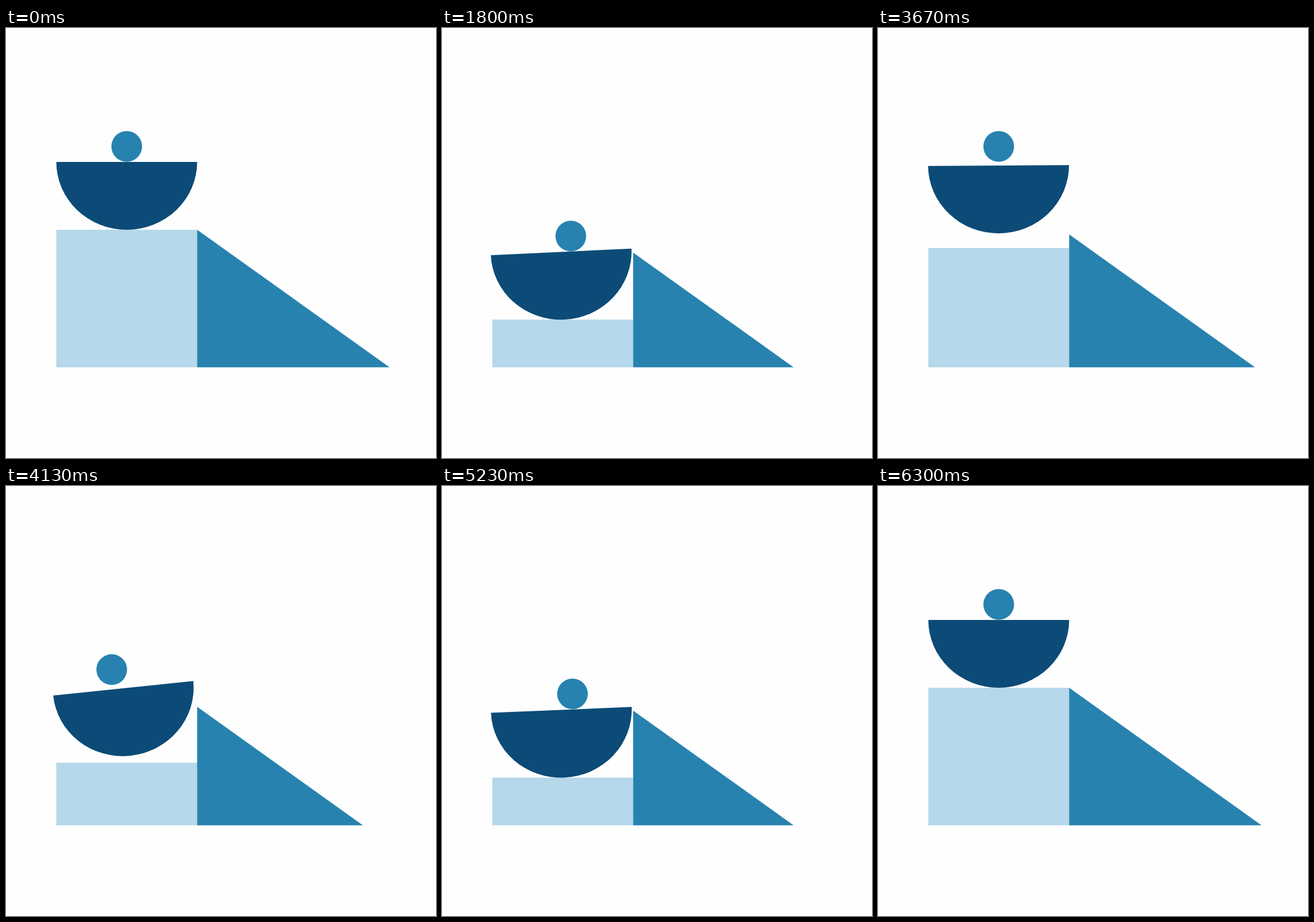
An HTML page that plays this animation: 748 px wide and 748 px high, repeating every 6710 ms.

```html
<!DOCTYPE html>
<html lang="en">
<head>
<meta charset="utf-8">
<title>Balancing shapes</title>
<style>
  html, body { margin: 0; width: 100%; height: 100%; overflow: hidden; background: #fefefe; }
  svg { display: block; width: 100%; height: 100%; }
</style>
</head>
<body>
<svg viewBox="0 0 748 748">
  <path id="block" fill="#b5d8ea"/>
  <path id="ramp" fill="#2782af"/>
  <path id="bowl" fill="#0c4b77" d="M-122.5-59H122.5A122.5 118 0 0 1-122.5-59Z"/>
  <circle id="ball" fill="#2782af" r="26.7"/>
</svg>
<script>
const LOOP = 6710, FRAME = 100 / 3, PASS = 101;
const LAND = 31, LIFT = 59, END = 88;
const FLOOR = 590.2, SEAM = 332.5;
const [block, ramp, bowl, ball] = ['block', 'ramp', 'bowl', 'ball'].map(id => document.getElementById(id));

function ease(f, from, to) {
  const s = Math.min(1, Math.max(0, (f - from) / (to - from)));
  return s * s * (3 - 2 * s);
}

// Offset from rest: drop to low, settle at held, then lift back to zero.
function bounce(f, delay, low, held = low) {
  return low * ease(f, delay, LAND)
    + (held - low) * ease(f, LAND, LIFT)
    - held * ease(f, LIFT, END);
}

// The first pass skips every third frame, the second shows them all.
function frameAt(ms) {
  const k = Math.floor((ms + 5) / FRAME);
  if (k >= PASS) return k - PASS;
  return k % 3 === 2 ? k - 1 : k;
}

function draw(ms) {
  const f = frameAt(ms % LOOP);
  const squash = bounce(f, 0, 1);
  const scale = 1 - 0.166 * squash;
  block.setAttribute('d', `M87.5 ${FLOOR}V${351 + 156.3 * squash}H${SEAM}V${FLOOR}Z`);
  ramp.setAttribute('d', `M${SEAM} ${FLOOR}V${590 - 239 * scale}L${SEAM + 334.7 * scale} ${FLOOR}Z`);

  const bowlY = 292 + bounce(f, 6, 156.4);
  const tilt = bounce(f, 6, -7.75, -2.2);
  bowl.setAttribute('transform', `translate(210 ${bowlY}) rotate(${tilt})`);

  ball.setAttribute('cx', 210 + bounce(f, 9, -37.3, 18.8));
  ball.setAttribute('cy', 206 + bounce(f, 9, 162, 155.4));
}

const start = performance.now();
function tick() {
  draw(performance.now() - start);
  requestAnimationFrame(tick);
}
tick();
</script>
</body>
</html>
```
